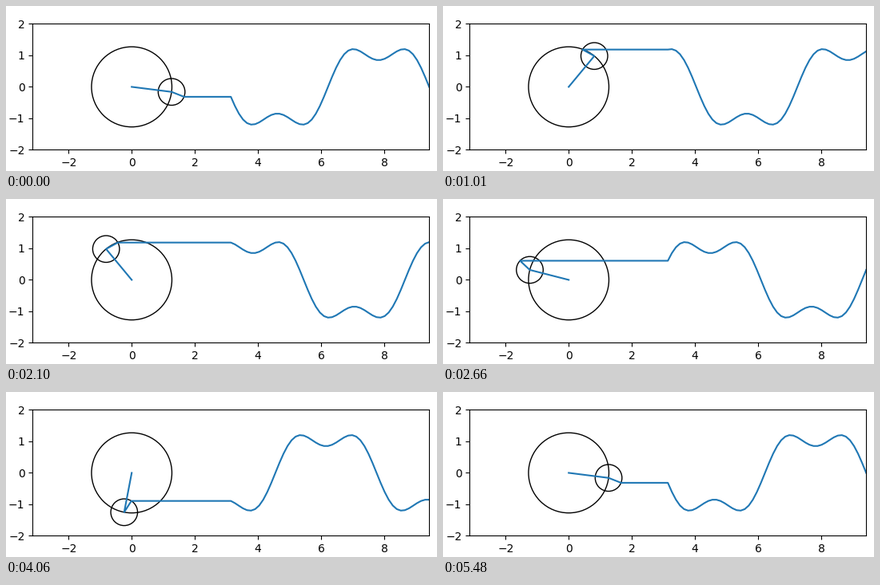
These frames come from a looping animation (539x207 px, 5580 ms). A matplotlib script:

```python
import numpy as np
import matplotlib.pyplot as plt
from matplotlib.animation import FuncAnimation

W, H, DPI = 539, 207, 100
TICK = 20          # ms per animation frame
STEPS = 50         # pose steps per turn
DTHETA = 2 * np.pi / STEPS
HARMONICS = (1, 3)

# How long each pose stays, in units of 10 ms
HOLDS = [12, 9, 10, 14, 9, 14, 9, 10, 14, 9, 9, 10, 15, 9, 14, 10, 9,
         10, 14, 9, 10, 14, 9, 14, 9, 10, 14, 9, 10, 14, 9, 9, 10, 14,
         11, 10, 11, 14, 9, 10, 9, 10, 15, 9, 14, 10, 9, 10, 15, 8, 10]
ends = 10 * np.cumsum(HOLDS)


def radius(n):
    return 4 / (n * np.pi)


def square_wave(theta):
    return sum(radius(n) * np.sin(n * theta) for n in HARMONICS)


# The small surplus keeps the pixel size from being rounded down
fig = plt.figure(figsize=((W + 0.01) / DPI, (H + 0.01) / DPI), dpi=DPI,
                 facecolor="white")
ax = fig.add_axes([33.2 / W, 26.6 / H, 496 / W, 157.9 / H])
ax.set_xlim(-np.pi, 3 * np.pi)
ax.set_ylim(-2, 2)
ax.set_xticks(range(-2, 10, 2))
ax.set_yticks(range(-2, 3))

circles = [ax.add_patch(plt.Circle((0, 0), radius(n), fill=False))
           for n in HARMONICS]
line, = ax.plot([], [], color="C0", lw=1.5)

wave_x = np.linspace(np.pi, 3 * np.pi, STEPS)
lags = DTHETA * np.arange(STEPS)


def update(i):
    pose = np.searchsorted(ends, i * TICK, side="right")
    theta = (pose - 1) * DTHETA
    xs, ys = [0.0], [0.0]
    for n, circle in zip(HARMONICS, circles):
        circle.center = xs[-1], ys[-1]
        xs.append(xs[-1] + radius(n) * np.cos(n * theta))
        ys.append(ys[-1] + radius(n) * np.sin(n * theta))
    line.set_data(np.append(xs, wave_x),
                  np.append(ys, square_wave(theta - lags)))
    return [*circles, line]


anim = FuncAnimation(fig, update, frames=int(ends[-1]) // TICK,
                     interval=TICK, repeat=True, repeat_delay=0,
                     init_func=lambda: update(0), cache_frame_data=False)
plt.show()
```
